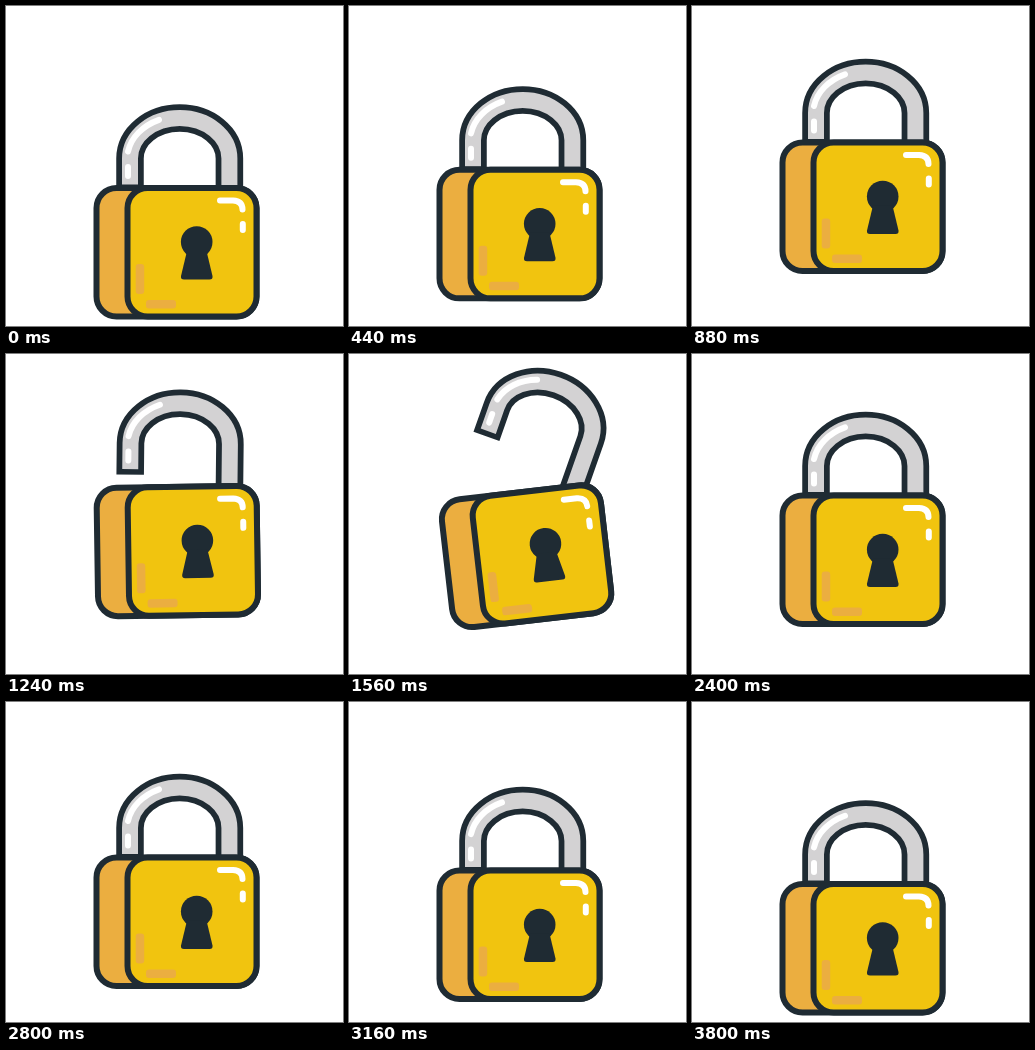
Write an HTML page that moves like this. It is 337 by 320 pixels and loops after 3.84 s.

```html
<!DOCTYPE html>
<html lang="en">
<head>
<meta charset="utf-8">
<title>Padlock</title>
<style>
  html, body { margin: 0; width: 100%; height: 100%; overflow: hidden; background: #fff; }
  svg { display: block; width: 100vw; height: 100vh; }
  .tube { fill: none; }
  .outlined { stroke: #1f2b33; stroke-width: 6; }
  .shine { fill: none; stroke: #fff; stroke-width: 6; stroke-linecap: round; }
</style>
</head>
<body>
<svg viewBox="0 0 337 320">
  <g id="lock">
    <g id="shackle">
      <path class="tube" stroke="#1f2b33" stroke-width="27.5" d="M124 184V152.5a49.7 40.5 0 0 1 99.4 0V208"/>
      <path class="tube" stroke="#d3d2d3" stroke-width="16" d="M124 178.5V152.5a49.7 40.5 0 0 1 99.4 0V204"/>
      <path class="shine" stroke-width="5" d="M122 161V170M122 145.5A53 43 0 0 1 153 113.8"/>
    </g>
    <rect class="outlined" fill="#ebae40" x="90.5" y="182" width="160" height="128.5" rx="20"/>
    <rect class="outlined" fill="#f1c40f" x="121.5" y="182" width="129" height="128.5" rx="20"/>
    <path class="shine" d="M214 194.5H227Q236.5 195 236.5 203.5M236.8 218V224"/>
    <g fill="#ebae40">
      <rect x="129.7" y="258" width="8.5" height="30" rx="3"/>
      <rect x="140" y="294" width="30" height="8.5" rx="3"/>
    </g>
    <g fill="#1f2b33">
      <circle cx="190.7" cy="236" r="15.8"/>
      <path d="M181 245H200.5L206.5 270Q207 273.5 203.5 273.5H178Q174.5 273.5 175 270Z"/>
    </g>
  </g>
</svg>
<script>
const LOOP = 3840, HINGE = '226 188';
const lock = document.getElementById('lock');
const shackle = document.getElementById('shackle');

// Each track is a list of [time in ms, value], eased in and out between keys.
const tracks = {
  rise:  [[0, 0], [1080, -50], [1840, -50], [LOOP, 0]],
  hop:   [[1680, 0], [1760, 3], [2000, -4.5], [2200, 0]],
  tilt:  [[1120, 0], [1720, -8], [2200, 0]],
  swing: [[1200, 0], [1480, 26], [1680, 26], [2200, 0]],
  lift:  [[1120, 0], [1320, -19], [1680, -19], [1980, 16], [2200, 0]]
};

function valueAt(keys, t) {
  const next = keys.findIndex(key => key[0] > t);
  if (next === 0) return keys[0][1];
  if (next < 0) return keys[keys.length - 1][1];
  const [t0, a] = keys[next - 1], [t1, b] = keys[next];
  const p = (t - t0) / (t1 - t0);
  return a + (b - a) * p * p * (3 - 2 * p);
}

function draw() {
  const t = Math.floor(performance.now() % LOOP / 40) * 40;
  const at = name => valueAt(tracks[name], t);
  lock.setAttribute('transform', `translate(0 ${at('rise') + at('hop')}) rotate(${at('tilt')} ${HINGE})`);
  shackle.setAttribute('transform', `rotate(${at('swing')} ${HINGE}) translate(0 ${at('lift')})`);
  requestAnimationFrame(draw);
}
draw();
</script>
</body>
</html>
```
